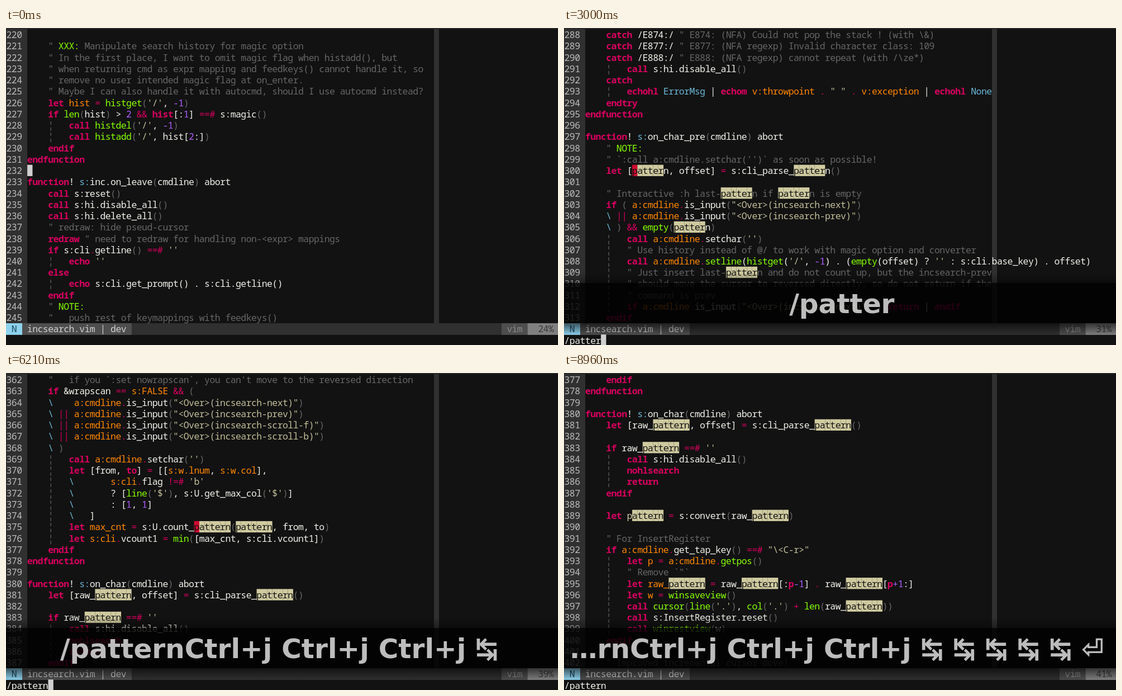
Animation, 988 px wide and 567 px high, one loop 9520 ms. Source, as an HTML page with a canvas:

```html
<!DOCTYPE html>
<html lang="en">
<head>
<meta charset="utf-8">
<title>Incremental search</title>
<style>
html, body { margin: 0; width: 100%; height: 100%; overflow: hidden; background: #121212; }
canvas { display: block; }
</style>
</head>
<body>
<canvas id="stage" width="988" height="567"></canvas>
<script id="code" type="text/plain">@220

    " XXX: Manipulate search history for magic option
    " In the first place, I want to omit magic flag when histadd(), but
    " when returning cmd as expr mapping and feedkeys() cannot handle it, so
    " remove no user intended magic flag at on_enter.
    " Maybe I can also handle it with autocmd, should I use autocmd instead?
    let hist = histget('/', -1)
    if len(hist) > 2 && hist[:1] ==# s:magic()
        call histdel('/', -1)
        call histadd('/', hist[2:])
    endif
endfunction

function! s:inc.on_leave(cmdline) abort
    call s:reset()
    call s:hi.disable_all()
    call s:hi.delete_all()
    " redraw: hide pseud-cursor
    redraw " need to redraw for handling non-<expr> mappings
    if s:cli.getline() ==# ''
        echo ''
    else
        echo s:cli.get_prompt() . s:cli.getline()
    endif
    " NOTE:
    "   push rest of keymappings with feedkeys()
@288
    catch /E874:/ " E874: (NFA) Could not pop the stack ! (with \&)
    catch /E877:/ " E877: (NFA regexp) Invalid character class: 109
    catch /E888:/ " E888: (NFA regexp) cannot repeat (with /\ze*)
        call s:hi.disable_all()
    catch
        echohl ErrorMsg | echom v:throwpoint . " " . v:exception | echohl None
    endtry
endfunction

function! s:on_char_pre(cmdline) abort
    " NOTE:
    " `:call a:cmdline.setchar('')` as soon as possible!
    let [pattern, offset] = s:cli_parse_pattern()

    " Interactive :h last-pattern if pattern is empty
    if ( a:cmdline.is_input("<Over>(incsearch-next)")
    \ || a:cmdline.is_input("<Over>(incsearch-prev)")
    \ ) && empty(pattern)
        call a:cmdline.setchar('')
        " Use history instead of @/ to work with magic option and converter
        call a:cmdline.setline(histget('/', -1) . (empty(offset) ? '' : s:cli.base_key) . offset)
        " Just insert last-pattern and do not count up, but the incsearch-prev
        " should move the cursor to reversed directly, so do not return if the
        " command is prev
        if a:cmdline.is_input("<Over>(incsearch-next)") | return | endif
    endif
@316
        call a:cmdline.setchar('')
        if a:cmdline.flag ==# 'n' " exit stay mode
            let s:cli.flag = ''
        else
            let s:cli.vcount1 += 1
        endif
    elseif a:cmdline.is_input("<Over>(incsearch-prev)")
        call a:cmdline.setchar('')
        if a:cmdline.flag ==# 'n' " exit stay mode
            let s:cli.flag = ''
        endif
        let s:cli.vcount1 -= 1
        if s:cli.vcount1 < 1
            let s:cli.vcount1 += s:U.count_pattern(pattern)
        endif
    elseif (a:cmdline.is_input("<Over>(incsearch-scroll-f)")
    \       && (s:cli.flag ==# '' || s:cli.flag ==# 'n'))
    \ ||   (a:cmdline.is_input("<Over>(incsearch-scroll-b)") && s:cli.flag ==# 'b')
        call a:cmdline.setchar('')
        if a:cmdline.flag ==# 'n' | let s:cli.flag = '' | endif
        let pos_expr = a:cmdline.is_input("<Over>(incsearch-scroll-f)") ? 'w$' : 'w0'
        let to_col = a:cmdline.is_input("<Over>(incsearch-scroll-f)")
        \          ? s:U.get_max_col(pos_expr) : 1
        let [from, to] = [getpos('.')[1:2], [line(pos_expr), to_col]]
        let cnt = s:U.count_pattern(pattern, from, to)
        let s:cli.vcount1 += cnt
    elseif (a:cmdline.is_input("<Over>(incsearch-scroll-b)")
    \       && (s:cli.flag ==# '' || s:cli.flag ==# 'n'))
    \ ||   (a:cmdline.is_input("<Over>(incsearch-scroll-f)") && s:cli.flag ==# 'b')
        call a:cmdline.setchar('')
        if a:cmdline.flag ==# 'n'
            let s:cli.flag = ''
            let s:cli.vcount1 -= 1
        endif
        let pos_expr = a:cmdline.is_input("<Over>(incsearch-scroll-f)") ? 'w$' : 'w0'
        let to_col = a:cmdline.is_input("<Over>(incsearch-scroll-f)")
        \          ? s:U.get_max_col(pos_expr) : 1
        let [from, to] = [getpos('.')[1:2], [line(pos_expr), to_col]]
        let cnt = s:U.count_pattern(pattern, from, to)
        let s:cli.vcount1 -= cnt
        if s:cli.vcount1 < 1
            let s:cli.vcount1 += s:U.count_pattern(pattern)
        endif
    endif

    " Handle nowrapscan:
    "   if you `:set nowrapscan`, you can't move to the reversed direction
    if &wrapscan == s:FALSE && (
    \    a:cmdline.is_input("<Over>(incsearch-next)")
    \ || a:cmdline.is_input("<Over>(incsearch-prev)")
    \ || a:cmdline.is_input("<Over>(incsearch-scroll-f)")
    \ || a:cmdline.is_input("<Over>(incsearch-scroll-b)")
    \ )
        call a:cmdline.setchar('')
        let [from, to] = [[s:w.lnum, s:w.col],
        \       s:cli.flag !=# 'b'
        \       ? [line('$'), s:U.get_max_col('$')]
        \       : [1, 1]
        \   ]
        let max_cnt = s:U.count_pattern(pattern, from, to)
        let s:cli.vcount1 = min([max_cnt, s:cli.vcount1])
    endif
endfunction

function! s:on_char(cmdline) abort
    let [raw_pattern, offset] = s:cli_parse_pattern()

    if raw_pattern ==# ''
        call s:hi.disable_all()
        nohlsearch
        return
    endif

    let pattern = s:convert(raw_pattern)

    " For InsertRegister
    if a:cmdline.get_tap_key() ==# "\<C-r>"
        let p = a:cmdline.getpos()
        " Remove `"`
        let raw_pattern = raw_pattern[:p-1] . raw_pattern[p+1:]
        let w = winsaveview()
        call cursor(line('.'), col('.') + len(raw_pattern))
        call s:InsertRegister.reset()
        call winrestview(w)
    endif

    " Improved Incremental cursor move!
</script>
<script>
const LOOP = 9520, ROWS = 26, TOTAL = 943;
const CW = 9.33, RH = 20.24, X0 = 0.8, Y0 = 1.8;
const BG = '#121212', GUTTER = '#303030', WHITE = '#f0f0ea', GRAY = '#666666', PINK = '#d7005f',
  GREEN = '#87ff00', ORANGE = '#ff8700', PURPLE = '#af5fff', KHAKI = '#c2be9a', CYAN = '#6cb8d6',
  HIT = '#d0cba0', RED = '#d00a30', CURSOR = '#d0d0d0';
const ctx = document.getElementById('stage').getContext('2d');

// Tried in order at each position; the third entry marks bold
const RULES = [
  [/(XXX|NOTE):/y, GREEN],
  [/^\s*" (?=XXX:|NOTE:)/y, GRAY],
  [/^\s*".*|(?<=XXX:).*/y, GRAY],
  [/'[^']*'|"[^"]*"/y, KHAKI],
  [/".*/y, GRAY],
  [/^\s*\\|(?<=function! )s:|ErrorMsg\b|None\b/y, CYAN],
  [/(let|if|elseif|else|endif|call|function|endfunction|echo|echohl|echom|redraw|catch|endtry|return|nohlsearch)\b/y, PINK, 1],
  [/to(?=\])|p(?=[-+])|hist(?=\[:)/y, PINK, 1],
  [/(histget|histdel|histadd|len|empty|setline|getpos|line|col|min|cursor|winsaveview|winrestview)(?=\()/y, GREEN],
  [/(?<=let )[\w:]+|a:cmdline|v:\w+|s:FALSE|s:w\.\w+|(?<=if |  )s:cli(?=\.(fl|vc))/y, ORANGE],
  [/(?<=a:cmdline|let s:cli|if s:cli|  s:cli|point |" |\] )\./y, PINK],
  [/[=!]=#?|&&|\|\||[-+]=|=/y, PINK],
  [/[-+]?\d+\b/y, PURPLE],
  [/\+/y, PINK],
  [/\w+/y, WHITE],
];

function paint(text) {
  const cells = [], paren = /echo s|setline|\(s:cli/.test(text) ? WHITE : GRAY;
  const indent = text.search(/\S/);
  while (cells.length < text.length) {
    const at = cells.length;
    let len = 1, color = /[()]/.test(text[at]) ? paren : WHITE, bold = 0;
    for (const [re, c, b] of RULES) {
      re.lastIndex = at;
      const m = re.exec(text);
      if (m && m[0]) { len = m[0].length; color = c; bold = b; break; }
    }
    for (let i = at; i < at + len; i++) cells.push({ ch: text[i], color, bold });
  }
  for (let i = 4; i < indent; i += 4) cells[i] = { ch: '¦', color: GRAY };
  return { text, cells };
}

const lines = {};
let number = 0;
for (const row of document.getElementById('code').textContent.trimEnd().split('\n')) {
  if (row[0] === '@') number = +row.slice(1);
  else lines[number++] = paint(row);
}

// Key captions: time, text
const keys = n => '/pattern' + 'Ctrl+j '.repeat(n);
const tabs = n => keys(3) + '↹ '.repeat(n);
const captions = [
  [0, ''], [1020, '/'], [1380, '/p'], [1620, '/pa'], [1900, '/pat'], [2150, '/patt'],
  [2330, '/patte'], [2800, '/patter'], [3080, '/pattern'], [3770, keys(1)], [4230, keys(2)],
  [5010, keys(3)], [6210, tabs(1)], [6630, tabs(2)], [7100, tabs(3)], [7450, tabs(4)],
  [7940, tabs(5)], [8800, tabs(5) + '⏎ '],
];

// Editor states: time, command, top line, current line, match in that line,
// and for half drawn screens the former top and current line
const views = [
  [0, '', 220, 232], [1100, '/', 220, 232], [1470, '/p', 220, 237, 0], [1710, '/pa', 288, 300, 0],
  [2080, '/pat', 288, 300, 0], [2230, '/patt', 288, 300, 0], [2430, '/patte', 288, 300, 0],
  [3000, '/patter', 288, 300, 0], [3170, '/pattern', 288, 300, 0],
  [3770, '/pattern', 316, 329, 0, 288, 300], [3840, '/pattern', 316, 329, 0],
  [4320, '/pattern', 341, 354, 0, 316, 329], [4420, '/pattern', 341, 354, 0],
  [5070, '/pattern', 362, 375, 0], [6310, '/pattern', 363, 375, 1], [6700, '/pattern', 369, 381, 0],
  [7160, '/pattern', 369, 381, 1], [7570, '/pattern', 371, 383, 0], [8020, '/pattern', 377, 389, 0],
];

const current = (list, t) => list.findLast(s => s[0] <= t);

function block(row, col, n, color) {
  ctx.fillStyle = color;
  ctx.fillRect(X0 + col * CW, Y0 + row * RH, n * CW, RH);
}

function glyph(row, col, ch, color, bold) {
  ctx.font = (bold ? 'bold ' : '') + '16.5px "Noto Sans Mono", "DejaVu Sans Mono", monospace';
  ctx.fillStyle = color;
  ctx.fillText(ch, X0 + (col + 0.5) * CW, Y0 + row * RH + 16.4);
}

function print(row, col, text, color) {
  [...text].forEach((ch, i) => glyph(row, col + i, ch, color));
}

function drawLine(row, num, word, hit, t, limit) {
  const { text, cells } = lines[num];
  const shown = cells.slice(0, limit), marks = {};
  if (word) {
    let n = 0;
    for (let at = text.indexOf(word); at >= 0; at = text.indexOf(word, at + word.length), n++) {
      for (let i = 0; i < word.length; i++) marks[at + i] = HIT;
      if (n === hit && t < 8880) marks[at] = RED;
      if (n === hit && t >= 8960) marks[at] = BG;
    }
  }
  print(row, 0, String(num), '#bcbcbc');
  shown.forEach((cell, i) => marks[i] && block(row, i + 4, 1, marks[i]));
  shown.forEach(({ ch, color, bold }, i) => {
    const mark = marks[i];
    if (ch !== ' ') glyph(row, i + 4, ch, mark ? (mark === BG ? HIT : BG) : color, bold && !mark);
  });
}

function drawStatus(line) {
  const y = Y0 + ROWS * RH;
  const bar = (x, end, color) => { ctx.fillStyle = color; ctx.fillRect(x, y, end - x, RH + 0.6); };
  bar(0, 988, GUTTER);
  bar(0, 29, '#8ed2ee');
  bar(29, 225, '#4e4e4e');
  bar(887, 933.5, '#4e4e4e');
  bar(933.5, 988, '#808080');
  print(ROWS, 1, 'N', '#1c4a60');
  print(ROWS, 4, 'incsearch.vim | dev', '#d0d0d0');
  print(ROWS, 96, 'vim', '#8a8a8a');
  print(ROWS, 102, Math.floor(line * 100 / TOTAL) + '%', '#3a3a3a');
}

function shade(y, end, from, to) {
  const g = ctx.createLinearGradient(0, y, 0, end);
  g.addColorStop(0, `rgba(0,0,0,${from})`);
  g.addColorStop(1, `rgba(0,0,0,${to})`);
  ctx.fillStyle = g;
  ctx.fillRect(0, y, 988, end - y);
}

function drawCaption(text) {
  shade(437, 456, 0, 0.35);
  shade(456, 528, 0.35, 0.35);
  shade(528, 548, 0.6, 0.05);
  ctx.globalAlpha = 0.74;
  ctx.fillStyle = '#000';
  ctx.fillRect(0, 456, 988, 72);
  ctx.font = 'bold 48.5px "DejaVu Sans", sans-serif';
  let shown = text;
  for (let cut = 1; ctx.measureText(shown).width > 988; cut++) shown = '…' + text.slice(cut);
  ctx.textAlign = 'left';
  ctx.fillStyle = '#fff';
  ctx.fillText(shown, 497.3 - ctx.measureText(shown).width / 2, 509.7);
  ctx.globalAlpha = 1;
}

function draw(t) {
  const [, cmd, top, line, hit, oldTop, oldLine] = current(views, t);
  const caption = current(captions, t)[1];
  ctx.fillStyle = BG;
  ctx.fillRect(0, 0, 988, 567);
  ctx.fillStyle = GUTTER;
  ctx.fillRect(0, 0, 988, 1.5);
  ctx.fillRect(0, Y0, 38, ROWS * RH);
  ctx.fillRect(766, Y0, 9, ROWS * RH);
  ctx.textAlign = 'center';
  for (let row = 0; row < ROWS; row++) {
    const stale = oldTop && row > 17;
    const num = row + (stale ? oldTop : top);
    drawLine(row, num, cmd.slice(1), num === line ? hit : -1, t, oldTop && row === 17 ? 74 : undefined);
  }
  if (t < 380) block(12, 4, 1, CURSOR);
  drawStatus(oldLine || line);
  print(27, 0, cmd, WHITE);
  if (cmd && t < 8880) block(27, cmd.length, 1, CURSOR);
  if (caption) drawCaption(caption);
}

function tick() {
  draw(performance.now() % LOOP);
  requestAnimationFrame(tick);
}
tick();
</script>
</body>
</html>
```
